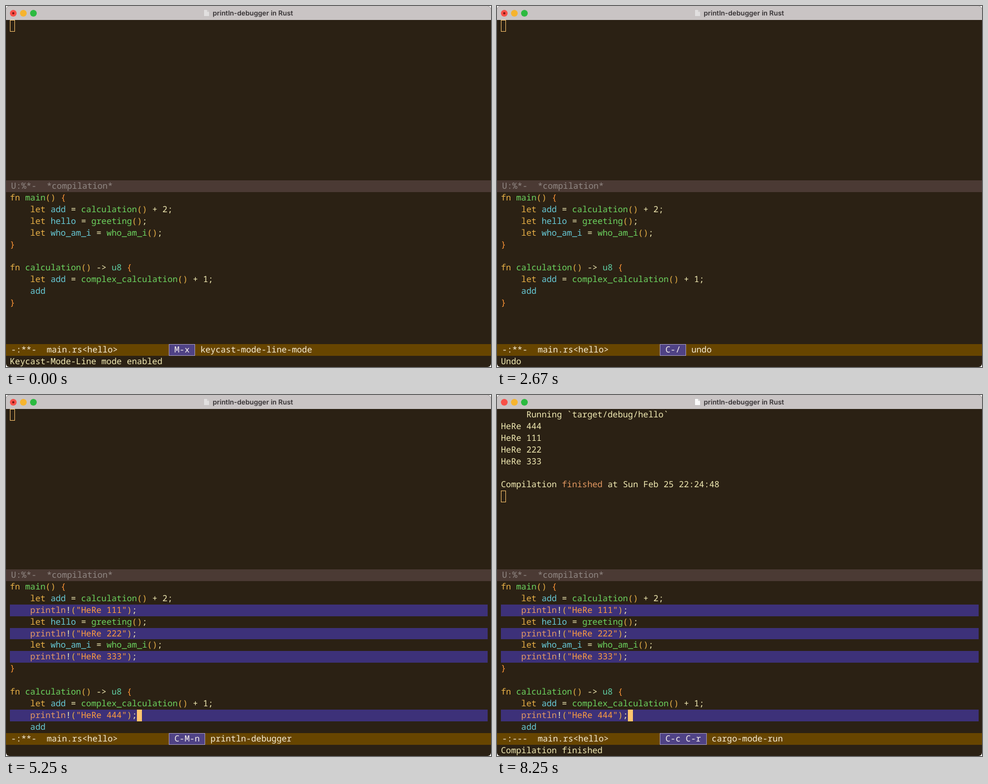
An HTML page that plays this animation: 867 by 646 pixels, repeating every 8330 ms.

```html
<!DOCTYPE html>
<html lang="en">
<head>
<meta charset="utf-8">
<title>println-debugger in Rust</title>
<style>
  html, body { margin: 0; width: 100%; height: 100%; overflow: hidden; background: #fff; }
  #stage {
    position: relative; width: 867px; height: 646px; overflow: hidden; border-radius: 6px;
    background: #2b2114; color: #f3ecb4;
    font: 500 15.15px/20.87px 'Noto Sans Mono', 'DejaVu Sans Mono', monospace;
    font-variant-ligatures: none; text-rendering: geometricPrecision; white-space: pre;
  }
  #stage > * { position: absolute; left: 0; width: 867px; }
  #bar { top: 0; height: 25px; background: #c9c4c4; }
  #bar i { position: absolute; top: 6.5px; width: 12px; height: 12px; border-radius: 50%; }
  #bar b {
    position: absolute; left: 369.5px; top: 0; color: #363234;
    font: 600 12.15px/25px Inter, 'Open Sans', sans-serif;
  }
  #dot { position: absolute; left: 10.5px; top: 10.5px; width: 4px; height: 4px; border-radius: 50%; background: #7c1512; }
  #doc { position: absolute; left: 353px; top: 6px; }
  .pane { padding-left: 7px; box-sizing: border-box; overflow: hidden; }
  #output { top: 25.2px; height: 287px; }
  #code { top: 333.2px; height: 271.6px; }
  #code div { height: 20.87px; }
  .print { width: 854px; background: #3d3179; }
  .mode { height: 20.87px; }
  #idle { top: 312.3px; background: #4b3a34; color: #918884; }
  #active { top: 604.8px; background: #674500; color: #f8efd8; }
  #key {
    position: absolute; left: 290.9px; top: 0; height: 18.87px; line-height: 18.87px;
    border: 1px solid #a298bd; background: #4f4285; color: #f8f2ee;
  }
  #echo { top: 625.7px; }
  #stage > #cursor, #stage > #hollow { width: 9.1px; height: 20.87px; box-sizing: border-box; }
  #cursor { background: #ffc56e; color: #2b2114; }
  #hollow { border: 1px solid #f2bd69; }
  .kw { color: #e9b147; } .fn { color: #6dd560; } .var { color: #68cbd8; } .type { color: #5fcfa5; }
  .macro { color: #e59a62; } .str { color: #ff9e3e; } .par { color: #e9b147; } .brace { color: #ff9636; }
</style>
</head>
<body>
<div id="stage">
  <div id="bar"><i style="left:6.5px;background:#f84f47"></i><i style="left:24.7px;background:#f6b42e"></i><i style="left:43px;background:#2cba40"></i><span id="dot"></span><svg id="doc" width="11" height="13"><path d="M.5 .5H7L10.5 4V12.5H.5Z" fill="#fafafa" stroke="#aaa6a6" stroke-width=".5"/><path d="M7 .5V4H10.5" fill="#ddd" stroke="#aaa6a6" stroke-width=".5"/></svg><b>println-debugger in Rust</b></div>
  <div id="output" class="pane"></div>
  <div id="hollow"></div>
  <div id="idle" class="mode"> U:%*-  *compilation*</div>
  <div id="code" class="pane"></div>
  <div id="cursor"></div>
  <div id="active" class="mode"><span id="status"></span><span id="key"></span><span id="command" style="position:absolute;top:0"></span></div>
  <div id="echo" class="pane"></div>
</div>
<script>
const LOOP = 8330, COL = 9.09, ROW = 20.87, LEFT = 7;
const $ = id => document.getElementById(id);

const source = `fn main() {
    let add = calculation() + 2;
    let hello = greeting();
    let who_am_i = who_am_i();
}

fn calculation() -> u8 {
    let add = complex_calculation() + 1;
    add
}`.split('\n');
const slots = [1, 2, 3, 7]; // source lines followed by a print

const result = `     Running \`target/debug/hello\`
HeRe 444
HeRe 111
HeRe 222
HeRe 333

Compilation <span class="macro">finished</span> at Sun Feb 25 22:24:48`;

const here = n => ['111', '222', '333', '444'].slice(0, n).map(d => `"HeRe ${d}"`);
const next = (at, row, col, prints, times = '') =>
  ({ at, key: 'C-n', command: 'next-line' + times, row, col, prints });
const insert = (at, row, col, prints) =>
  ({ at, key: 'C-M-n', command: 'println-debugger', row, col, prints });
const run = { key: 'C-c C-r', command: 'cargo-mode-run', row: 11, col: 25, prints: here(4), saved: true };

const steps = [
  { at: -600, key: 'M-x', command: 'keycast-mode-line-mode', row: 0, col: 8, prints: [], echo: 'Keycast-Mode-Line mode enabled' },
  next(670, 1, 8, []),
  insert(1080, 2, 31, ['"add: {:?}", add']),
  { at: 1920, key: 'C-/', command: 'undo', row: 1, col: 8, prints: [], echo: 'Undo' },
  insert(2750, 2, 25, here(1)),
  next(3080, 3, 25, here(1)),
  insert(3330, 4, 25, here(2)),
  next(3580, 5, 25, here(2)),
  insert(4000, 6, 25, here(3)),
  next(4250, 7, 1, here(3)),
  next(4330, 8, 0, here(3), ' x2'),
  next(4420, 9, 24, here(3), ' x3'),
  next(4500, 10, 25, here(3), ' x4'),
  insert(5000, 11, 25, here(4)),
  { ...run, at: 6830 },
  { ...run, at: 7000, done: true, echo: 'Compilation finished' }
];

const tokens = /(?<str>"[^"]*")|(?<kw>\b(?:fn|let)\b)|(?<macro>println)|(?<fn>\w+(?=\())|(?<var>(?<=let )\w+|(?<=^ +)add$)|(?<type>u8)|(?<par>[()])|(?<brace>[{}])/g;
const escape = s => s.replace(/</g, '&lt;').replace(/>/g, '&gt;');
const paint = line => escape(line).replace(tokens, (text, ...rest) => {
  const groups = rest.at(-1);
  return `<span class="${Object.keys(groups).find(k => groups[k])}">${text}</span>`;
});

function listing(prints) {
  return source.flatMap((line, i) => {
    const print = prints[slots.indexOf(i)];
    return print ? [line, `    println!(${print});`] : [line];
  });
}

function show(step) {
  const lines = listing(step.prints);
  $('code').innerHTML = lines.map(line =>
    `<div${line.includes('println') ? ' class="print"' : ''}>${paint(line)}</div>`).join('');
  $('cursor').style.left = LEFT + step.col * COL + 'px';
  $('cursor').style.top = 333.2 + step.row * ROW + 'px';
  $('cursor').textContent = lines[step.row][step.col] || '';
  $('output').innerHTML = step.done ? result : '';
  $('hollow').style.left = LEFT + 'px';
  $('hollow').style.top = 25.2 + (step.done ? 7 * ROW : 0) + 'px';
  $('status').textContent = ` -:${step.saved ? '--' : '**'}-  main.rs<hello>`;
  $('key').textContent = ` ${step.key} `;
  $('command').textContent = step.command;
  $('command').style.left = 290.9 + (step.key.length + 3) * COL + 2 + 'px';
  $('echo').textContent = step.echo || '';
  $('dot').style.display = step.saved ? 'none' : 'block';
  $('doc').style.opacity = step.saved ? 1 : 0.5;
}

let current;
function frame() {
  const t = performance.now() % LOOP;
  const step = steps.findLast(s => s.at <= t);
  if (step !== current) show(current = step);
  // the cursor blinks, starting afresh with each command
  $('cursor').style.visibility = (t - step.at) % 1000 < 500 ? 'visible' : 'hidden';
  requestAnimationFrame(frame);
}
frame();
</script>
</body>
</html>
```
